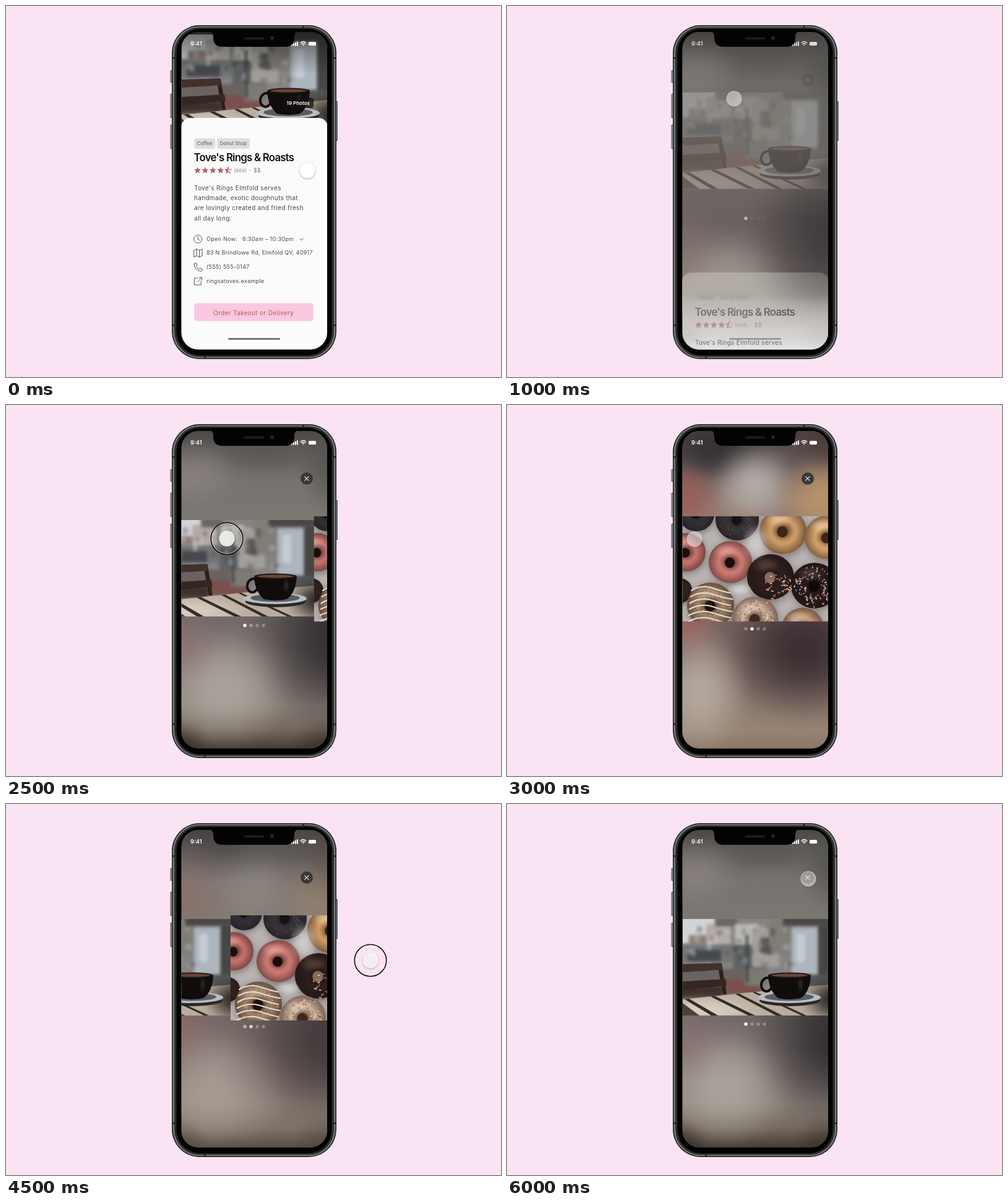
Write an HTML page with a canvas that moves like this. It is 800 px wide and 600 px high and loops after 6.5 s.

```html
<!DOCTYPE html>
<html lang="en">
<head>
<meta charset="utf-8">
<title>Gallery swipe</title>
<style>
html, body { margin: 0; width: 100%; height: 100%; overflow: hidden; background: #fae4f3; }
canvas { display: block; width: 800px; height: 600px; }
</style>
</head>
<body>
<canvas id="stage" width="800" height="600"></canvas>
<script>
const ctx = document.getElementById('stage').getContext('2d');
const LOOP = 6500, STEP = 500;
const SCREEN = { x: 284, y: 42, w: 235, h: 514 };

// Time keys: [ms, value, ...]
const PAGE = [[0, 0], [2200, 0], [2500, 0.09], [2850, 1], [4200, 1], [4500, 0.664], [4900, 0], [LOOP, 0]];
const OPEN = [[0, 0], [750, 0], [1000, 0.67], [1350, 1], [LOOP, 1]];
const TOUCH = [[0, 487, 266], [500, 385, 166], [900, 367, 150], [1500, 367, 150], [2000, 378, 212],
  [2500, 357, 216], [3000, 303, 217], [3500, 330, 222], [4000, 498, 246], [4500, 589, 253],
  [5000, 545, 200], [5500, 488, 125], [6000, 487, 121], [LOOP, 487, 121]];
const PRESS = [[0, 0], [2100, 0], [2400, 1], [2600, 1], [2850, 0], [4100, 0], [4400, 1], [4650, 1], [4900, 0], [LOOP, 0]];

function at(keys, t) {
  const i = Math.max(1, keys.findIndex(k => k[0] >= t));
  const a = keys[i - 1], b = keys[i], u = (t - a[0]) / (b[0] - a[0]);
  return a.slice(1).map((v, n) => v + (b[n + 1] - v) * u);
}

function seeded(seed) {
  return () => (seed = (seed * 16807) % 2147483647) / 2147483647;
}

function box(x, y, w, h, r, fill) {
  ctx.beginPath();
  ctx.roundRect(x, y, w, h, r);
  ctx.fillStyle = fill;
  ctx.fill();
}

function oval(x, y, rx, ry, fill) {
  ctx.beginPath();
  ctx.ellipse(x, y, rx, ry, 0, 0, Math.PI * 2);
  ctx.fillStyle = fill;
  ctx.fill();
}

function poly(points, fill) {
  ctx.beginPath();
  points.forEach(([x, y]) => ctx.lineTo(x, y));
  ctx.closePath();
  ctx.fillStyle = fill;
  ctx.fill();
}

function line(path, color, width = 1) {
  ctx.strokeStyle = color;
  ctx.lineWidth = width;
  ctx.lineCap = ctx.lineJoin = 'round';
  ctx.stroke(new Path2D(path));
}

function text(str, x, y, size, color, weight = 400, spacing = 0) {
  ctx.font = `${weight} ${size}px Inter, sans-serif`;
  ctx.letterSpacing = spacing + 'px';
  ctx.fillStyle = color;
  ctx.fillText(str, x, y);
}

function ramp(x0, y0, x1, y1, stops) {
  const g = ctx.createLinearGradient(x0, y0, x1, y1);
  stops.forEach(([p, c]) => g.addColorStop(p, c));
  return g;
}

function glow(x, y, rx, ry, rgb, alpha) {
  ctx.save();
  ctx.translate(x, y);
  ctx.scale(rx, ry);
  const g = ctx.createRadialGradient(0, 0, 0, 0, 0, 1);
  for (let i = 0; i <= 8; i++) {
    const u = i / 8;
    g.addColorStop(u, `rgba(${rgb},${alpha * (1 - u * u) ** 2})`);
  }
  ctx.fillStyle = g;
  ctx.fillRect(-1, -1, 2, 2);
  ctx.restore();
}

function layer(alpha, draw) {
  if (alpha <= 0) return;
  ctx.save();
  ctx.globalAlpha *= alpha;
  draw();
  ctx.restore();
}

function fillScreen(fill) {
  ctx.fillStyle = fill;
  ctx.fillRect(SCREEN.x - 1, SCREEN.y, SCREEN.w + 2, SCREEN.h);
}

function cafeBlur() {
  fillScreen(ramp(0, 42, 0, 556, [[0, '#4b4846'], [0.07, '#625f5c'], [0.16, '#77736f'], [0.28, '#7b7872'],
    [0.6, '#746b69'], [0.72, '#8a817c'], [0.86, '#8f857c'], [0.94, '#74695f'], [1, '#453b36']]));
  glow(305, 110, 85, 60, '152,142,138', 0.5);
  glow(420, 78, 90, 36, '84,82,78', 0.5);
  glow(525, 105, 60, 80, '72,71,66', 0.5);
  glow(535, 385, 170, 165, '44,39,43', 0.9);
  glow(352, 462, 115, 105, '178,172,164', 0.75);
  glow(284, 385, 70, 75, '140,110,113', 0.5);
  glow(284, 560, 50, 55, '45,38,35', 0.6);
  glow(519, 560, 70, 60, '48,40,36', 0.55);
}

function bakeryBlur() {
  fillScreen(ramp(0, 42, 0, 556, [[0, '#4a4243'], [0.12, '#6a5e5b'], [0.22, '#917d74'], [0.3, '#977f72'],
    [0.6, '#7a6662'], [0.8, '#86756d'], [0.94, '#978474'], [1, '#8a7768']]));
  glow(335, 72, 105, 65, '48,45,48', 0.85);
  glow(400, 128, 80, 75, '186,180,176', 0.85);
  glow(510, 148, 85, 75, '190,150,106', 0.85);
  glow(519, 55, 80, 55, '76,58,54', 0.7);
  glow(290, 150, 65, 70, '155,86,80', 0.75);
  glow(284, 352, 75, 70, '165,100,94', 0.75);
  glow(480, 395, 165, 135, '52,40,44', 0.9);
  glow(312, 462, 90, 115, '190,178,168', 0.8);
}

function clipTo(x, y, w, h) {
  ctx.beginPath();
  ctx.rect(x, y, w, h);
  ctx.clip();
}

function cafePhoto(x, y) {
  ctx.save();
  ctx.translate(x, y);
  clipTo(0, 0, 235, 156);
  ctx.fillStyle = '#858482';
  ctx.fillRect(0, 0, 235, 156);
  ctx.filter = 'blur(2.5px)';
  const street = [
    [-5, -5, 62, 45, '#d3d4d7'], [10, 26, 34, 16, '#8b7d79'], [38, 8, 40, 34, '#b3aba6'],
    [52, -4, 36, 16, '#6a6766'], [84, 8, 38, 36, '#bab8b4'], [-5, 42, 90, 28, '#737476'],
    [8, 50, 54, 18, '#45494d'], [82, 42, 32, 48, '#606365'], [112, 16, 44, 62, '#a19e98'],
    [124, 30, 20, 26, '#5c5b57'], [140, -4, 36, 60, '#807d77'], [162, -4, 78, 15, '#4a4847'],
    [176, 14, 44, 78, '#adb5bd'], [184, 24, 14, 46, '#c4ccd3'], [219, 8, 20, 100, '#474645'],
    [-5, 80, 140, 24, '#6a6361'], [62, 98, 66, 24, '#7a4f4d'], [100, 80, 36, 28, '#7b7a74'],
    [102, 25, 4, 78, '#3f4141'], [-5, 108, 70, 22, '#3d302d'], [170, 90, 70, 20, '#55575a']
  ];
  street.forEach(([bx, by, w, h, c]) => box(bx, by, w, h, 3, c));
  const rnd = seeded(17);
  for (let i = 0; i < 36; i++) {
    const dark = rnd() > 0.5;
    oval(rnd() * 175, 12 + rnd() * 72, 2 + rnd() * 5, 2 + rnd() * 6, dark ? 'rgba(40,42,44,.3)' : 'rgba(225,225,225,.28)');
  }
  ctx.filter = 'none';

  poly([[56, 72], [63, 72], [71, 122], [65, 122]], '#2c1f1b');
  poly([[0, 73], [62, 71], [64, 82], [0, 86]], '#42302a');
  poly([[0, 101], [69, 97], [71, 108], [0, 115]], '#36261f');

  poly([[0, 130], [125, 117], [235, 106], [235, 156], [0, 156]], '#b9ad9f');
  glow(35, 148, 110, 30, '222,213,202', 0.8);
  glow(245, 130, 62, 45, '46,40,37', 1);
  const gaps = [[3, 46, 7], [45, 106, 7], [85, 151, 6], [113, 192, 4]];
  gaps.forEach(([a, b, w]) => poly([[a, 130 - a * 0.1], [a + w, 129 - a * 0.1], [b + w + 4, 156], [b, 156]], '#352c27'));
  poly([[0, 136], [27, 156], [0, 156]], '#4a4039');

  oval(173, 132, 49, 9, '#2b2725');
  oval(172, 127, 51, 9, '#b9bdc4');
  oval(172, 126, 40, 6.5, '#595c62');
  ctx.lineWidth = 4;
  ctx.strokeStyle = '#0f0c0b';
  ctx.beginPath();
  ctx.ellipse(136, 106, 9, 11, 0.25, 0, Math.PI * 2);
  ctx.stroke();
  ctx.fillStyle = '#0f0c0b';
  ctx.fill(new Path2D('M138 91H207C206 112 199 122 191 128Q172 132 154 128C145 120 139 110 138 91Z'));
  oval(172.5, 91, 34.5, 4.5, '#1f1614');
  oval(172.5, 91, 29, 2.6, '#6b4436');
  glow(190, 106, 6, 14, '120,115,115', 0.25);
  ctx.restore();
}

function donut(x, y, r, rgb, light, hole) {
  glow(x + 1, y + 3, r * 1.3, r * 1.3, '35,26,24', 1);
  oval(x, y, r, r * 0.97, `rgb(${rgb})`);
  const rim = ctx.createRadialGradient(x, y, r * 0.55, x, y, r);
  rim.addColorStop(0, 'rgba(30,15,12,0)');
  rim.addColorStop(1, 'rgba(30,15,12,.45)');
  oval(x, y, r, r * 0.97, rim);
  glow(x - r * 0.2, y - r * 0.5, r * 0.7, r * 0.4, light, 0.6);
  glow(x, y, r * 0.55, r * 0.5, '35,18,15', 0.7);
  oval(x - 1, y + 1, r * 0.23, r * 0.24, hole);
}

function crumbs(x, y, r, colors, count, len, rnd) {
  for (let i = 0; i < count; i++) {
    const a = rnd() * 6.283, d = r * (0.36 + 0.58 * rnd()), turn = rnd() * 3.14;
    const px = x + Math.cos(a) * d, py = y + Math.sin(a) * d;
    ctx.strokeStyle = colors[i % colors.length];
    ctx.lineWidth = 1.5;
    ctx.beginPath();
    ctx.moveTo(px, py);
    ctx.lineTo(px + Math.cos(turn) * len, py + Math.sin(turn) * len);
    ctx.stroke();
  }
}

function bakeryPhoto(x, y) {
  const rnd = seeded(41);
  const candy = ['#e4ded5', '#c4694c', '#829aa8', '#d69a9a'];
  ctx.save();
  ctx.translate(x, y);
  clipTo(0, 0, 235, 170);
  ctx.fillStyle = '#b8b3b1';
  ctx.fillRect(0, 0, 235, 170);
  donut(22, -4, 29, '50,48,55', '120,120,132', '#121013');
  donut(88, 5, 35, '54,51,57', '122,120,132', '#141214');
  crumbs(88, 5, 34, ['rgba(150,150,160,.5)'], 50, 1, rnd);
  donut(162, 24, 38, '205,155,102', '242,212,168', '#3c2518');
  donut(233, 34, 36, '208,160,108', '242,212,168', '#3c2518');
  donut(5, 58, 32, '194,114,108', '236,170,162', '#1c0d0b');
  donut(77, 74, 35, '203,121,114', '238,170,162', '#1c0d0b');
  donut(-6, 120, 21, '48,34,30', '90,70,62', '#120b0a');
  donut(142, 98, 38, '44,31,27', '100,80,70', '#8a6a56');
  donut(213, 112, 38, '36,27,25', '90,74,68', '#0f0a09');
  glow(118, 42, 26, 34, '215,213,213', 0.7);
  glow(92, 118, 24, 12, '220,219,219', 0.7);
  crumbs(154, 114, 24, candy, 50, 3.5, rnd);
  crumbs(213, 112, 36, candy, 95, 3.5, rnd);
  donut(45, 144, 38, '158,126,102', '205,178,150', '#1e110c');
  crumbs(45, 144, 36, ['#6d4e3b', '#c9aa8e'], 90, 1.5, rnd);
  for (let i = 0; i < 6; i++) {
    const sy = 116 + i * 10;
    line(`M${14 - i} ${sy + 4}Q30 ${sy - 6} 48 ${sy}T${77 + i % 2 * 3} ${sy + 8}`, '#e6ddd3', 2.2);
  }
  donut(117, 166, 37, '200,170,148', '230,208,190', '#3f281c');
  crumbs(117, 166, 36, ['#845a42', '#e6d4c4'], 90, 1.5, rnd);
  donut(194, 181, 34, '190,146,114', '222,192,164', '#3f281c');
  ctx.restore();
}

function star(cx, cy, color, half) {
  const pts = [];
  for (let i = 0; i < 10; i++) {
    const r = i % 2 ? 2.6 : 5.8, a = -Math.PI / 2 + i * Math.PI / 5;
    pts.push([cx + r * Math.cos(a), cy + r * Math.sin(a)]);
  }
  poly(pts, half ? '#f6dfe4' : color);
  if (!half) return;
  poly(pts.slice(5).concat([pts[0]]), color);
  line('M' + pts.map(p => p.join(' ')).join('L') + 'Z', color, 0.8);
}

function sheet(dy) {
  const ink = '#4a4a4b', icon = '#555557';
  const body = ["Tove's Rings Elmfold serves", 'handmade, exotic doughnuts that',
    'are lovingly created and fried fresh', 'all day long.'];
  const note = (str, x, y) => text(str, x, y, 9, ink, 400, 0.3);
  ctx.save();
  ctx.translate(0, dy);
  box(283, 181, 237, 390, 15, '#fbfbfb');
  box(304, 214, 34, 17, 4, '#dedede');
  box(341, 214, 53, 17, 4, '#dedede');
  text('Coffee', 308.5, 225, 7.7, '#555', 400, 0.1);
  text('Donut Shop', 345.5, 225, 7.7, '#555', 400, 0.1);
  text("Tove's Rings & Roasts", 303.5, 251, 16.8, '#111112', 600, -0.75);
  for (let i = 0; i < 5; i++) star(309.5 + i * 12.4, 266, '#b25f63', i === 4);
  text('(668)', 368, 269, 8, '#8b8b8c', 400, 0.2);
  text('·', 393, 269, 9, '#777', 600);
  text('$$', 400, 269, 8.8, '#757576', 400, 0.3);
  body.forEach((row, i) => text(row, 304, 297.6 + i * 16.3, 10, ink, 400, 0.32));

  line('M303.7 377a6.5 6.5 0 1 0 13 0a6.5 6.5 0 1 0-13 0M310 373v4.3l2.8 1.5', icon);
  line('M304 395l4-2l4.5 2l4.5-2v11l-4.5 2l-4.5-2l-4 2zM308 393v11M312.5 395v11', icon);
  line('M304 417.5q0-1.7 1.7-1.7h2l1.3 3.5l-1.6 1.5q1.6 3.2 4.7 4.7l1.5-1.6l3.4 1.4v2q-.2 1.7-1.9 1.7q-10.3-1.1-11.1-11.5z', icon);
  line('M310 440h-5.8v11h11v-5.5M309 446.5l7.5-7.5m-4.5 0h4.5v4.5', icon);
  note('Open Now:', 324, 380.3);
  note('6:30am – 10:30pm', 382, 380.3);
  line('M474.5 376l3 3l3-3', icon);
  note('83 N Brindlowe Rd, Elmfold QV, 40917', 324, 402.3);
  note('(555) 555-0147', 324, 425.3);
  note('ringsatoves.example', 324, 448.3);
  box(304, 480.5, 193, 29, 5, '#f8c9e0');
  text('Order Takeout or Delivery', 335, 499.5, 10, '#b65a4b', 400, 0.35);
  ctx.restore();
}

function statusBar() {
  text('9:41', 298, 64, 9.2, '#fff', 600);
  for (let i = 0; i < 4; i++) box(461 + i * 3, 62 - i * 1.6, 2, 2.4 + i * 1.6, 0.5, '#fff');
  line('M476 59.5q4.3-3.8 8.6 0M477.8 61.5q2.5-2.1 5 0', '#fff', 1.4);
  oval(480.3, 63.2, 1, 1, '#fff');
  box(489, 58, 12, 6, 1.8, '#fff');
}

function galleryControls(page, open) {
  const show = Math.max(0, (open - 0.6) / 0.4);
  const lift = (1 - open) * -38;
  layer(show, () => {
    oval(486, 119, 10, 10, '#3b3837');
    line('M482.8 115.8l6.4 6.4m0-6.4l-6.4 6.4', '#fff', 1.1);
  });
  for (let i = 0; i < 4; i++) {
    const near = Math.max(0, 1 - Math.abs(page - i));
    layer(Math.max(show, near * 0.55), () =>
      oval(386 + i * 10, 356 + page * 6 + lift, 2.7, 2.7, `rgba(255,255,255,${0.28 + 0.72 * near})`));
  }
}

function phoneBody() {
  const edge = '#3f4140', face = '#8d8f8e';
  [[104, 20], [142, 39], [192, 39]].forEach(([y, h]) => {
    box(265.5, y, 4, h, 1, edge);
    box(266.2, y + 1, 2, h - 2, 0.5, face);
  });
  box(532, 154, 4, 64, 1, edge);
  box(533.8, 155, 1.5, 62, 0.5, face);
  box(268, 31, 266, 540, 45, '#1c1e1d');
  box(269.5, 32.5, 263, 537, 43.5, '#777a78');
  box(272, 34.5, 258, 533, 41, '#2b2d2c');
  box(275.5, 37, 251, 528, 38, '#030303');
  [84, 516].forEach(y => {
    box(268, y - 1, 5, 2.5, 0, '#202121');
    box(529, y - 1, 5, 2.5, 0, '#202121');
  });
  box(479, 31, 2.5, 5, 0, '#202121');
  box(320, 566, 2.5, 5, 0, '#202121');
}

function notch() {
  ctx.fillStyle = '#030303';
  ctx.fill(new Path2D('M327 40Q335 42 335 49V51Q335 66 350 66H451Q466 66 466 51V49Q466 42 474 40Z'));
  box(385, 50.5, 32, 4, 2, '#1c1c1d');
  oval(430, 52, 3.5, 3.5, '#17191d');
  oval(430, 52, 1.3, 1.3, '#3b3f4b');
}

function detailView() {
  cafePhoto(SCREEN.x, 46);
  fillScreen(ramp(0, 42, 0, 110, [[0, 'rgba(0,0,0,.5)'], [1, 'rgba(0,0,0,0)']]));
  box(448, 148, 49, 17, 4, 'rgba(20,17,16,.75)');
  text('19 Photos', 453.5, 159.8, 8, '#fff', 600);
  sheet(0);
}

// The veil over the sinking sheet thins out toward the bottom edge.
function openingView(open) {
  const drop = open * 373, top = 465, band = 3;
  layer(0.25, () => fillScreen('#000'));
  sheet(drop);
  cafePhoto(SCREEN.x, 46 + 140 * open);
  layer(Math.min(0.7, open), cafeBlur);
  for (let y = top; y < 556; y += band) {
    layer(0.85 * (y - top) / (556 - top), () => {
      clipTo(SCREEN.x, y, SCREEN.w, band);
      sheet(drop);
    });
  }
}

function galleryView(page) {
  cafePhoto(SCREEN.x - page * SCREEN.w, 186);
  bakeryPhoto(SCREEN.x + (1 - page) * SCREEN.w, 180);
}

function screen(page, open) {
  ctx.save();
  ctx.beginPath();
  ctx.roundRect(SCREEN.x - 0.5, SCREEN.y, SCREEN.w + 0.5, SCREEN.h - 0.5, 27);
  ctx.clip();
  cafeBlur();
  layer(page ** 3, bakeryBlur);
  if (open === 0) detailView();
  else if (open < 1) openingView(open);
  else galleryView(page);
  if (open > 0) galleryControls(page, open);
  layer(open < 1 ? 1 - open * 0.6 : 0, () => box(359, 537, 84, 2.8, 1.4, '#6c6c6d'));
  layer(open > 0 && open < 1 ? 0.8 : 1, statusBar);
  ctx.restore();
}

function touch(t) {
  const [x, y] = at(TOUCH, t), [press] = at(PRESS, t);
  const ring = (r, color, w) => {
    ctx.beginPath();
    ctx.arc(x, y, r, 0, Math.PI * 2);
    ctx.strokeStyle = color;
    ctx.lineWidth = w;
    ctx.stroke();
  };
  ctx.save();
  ctx.shadowColor = 'rgba(0,0,0,.35)';
  ctx.shadowBlur = 3;
  ctx.shadowOffsetY = 1;
  oval(x, y, 12.7, 12.7, `rgba(255,255,255,${t < STEP ? 1 : 0.53 + 0.3 * press})`);
  ctx.restore();
  layer(press, () => {
    ring(24.5, 'rgba(255,255,255,.75)', 1.2);
    ring(25.7, '#080808', 1.6);
  });
}

function render(t) {
  const [page] = at(PAGE, t), [open] = at(OPEN, t);
  ctx.fillStyle = '#fae4f3';
  ctx.fillRect(0, 0, 800, 600);
  phoneBody();
  screen(page, open);
  notch();
  touch(t);
}

// The picture advances in half-second steps.
let start = null, last = -1;
function tick(now) {
  if (start === null) start = now;
  const t = Math.floor(((now - start) % LOOP) / STEP) * STEP;
  if (t !== last) render(last = t);
  requestAnimationFrame(tick);
}
render(0);
requestAnimationFrame(tick);
</script>
</body>
</html>
```
